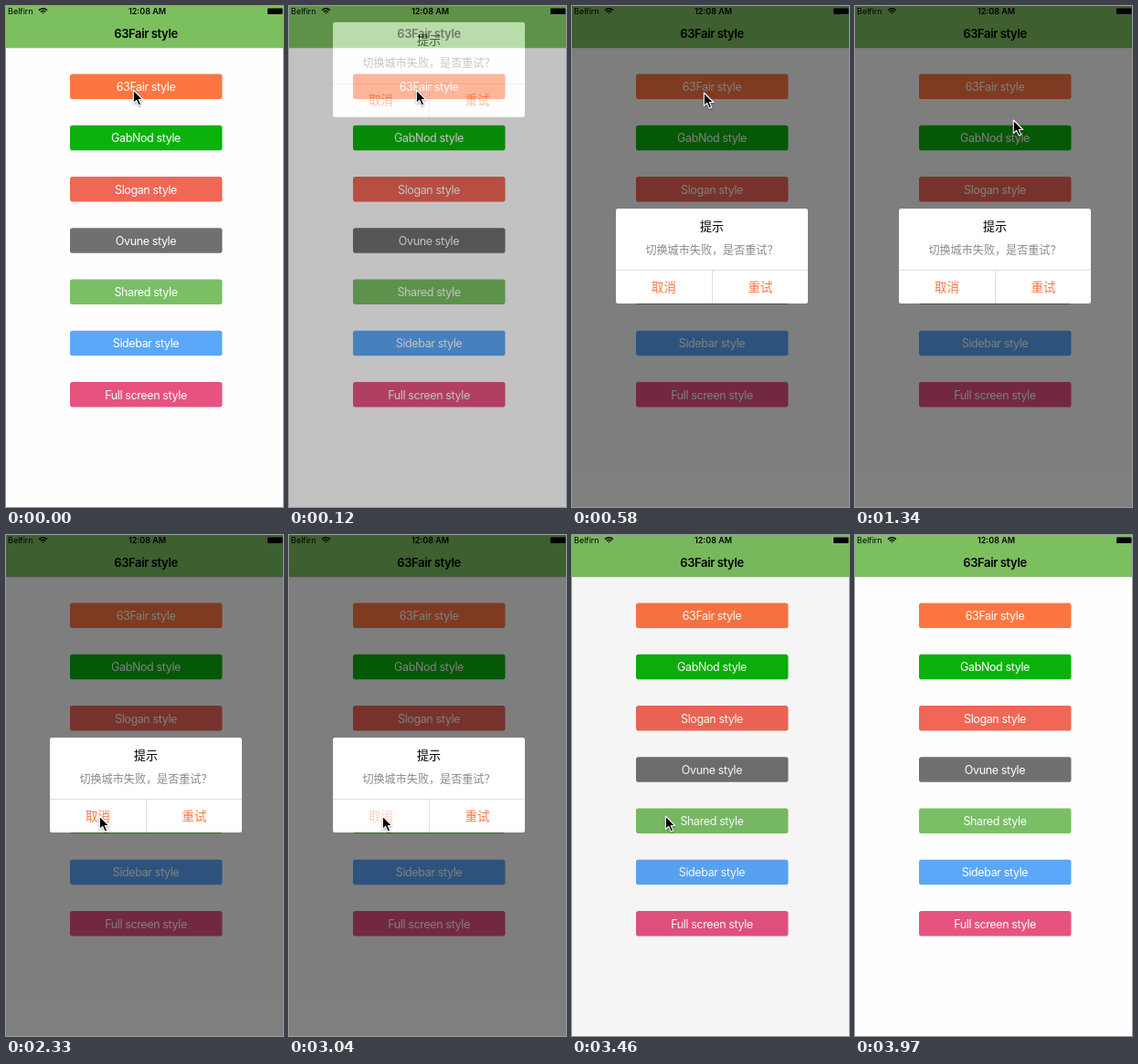
An HTML page that plays this animation: 303x549 px, repeating every 5310 ms.

```html
<!DOCTYPE html>
<html lang="zh-CN">
<head>
<meta charset="utf-8">
<style>
  html, body { margin: 0; width: 100%; height: 100%; overflow: hidden; background: #fefefe; }
  svg { display: block; width: 100vw; height: 100vh; }
  text { font-family: Inter, "Noto Sans CJK SC", "Noto Sans CJK", sans-serif; text-anchor: middle; }
  .status { font-size: 9px; }
  .title { font-size: 13px; font-weight: 600; letter-spacing: -.03em; }
  .label { font-size: 12.5px; letter-spacing: -.03em; fill: #fff; }
  #dialog text { font-family: "Noto Sans CJK SC", "Noto Sans CJK", sans-serif; }
  .action { font-size: 13.5px; fill: #fd7642; }
</style>
</head>
<body>
<svg viewBox="0 0 303 549">
  <rect width="303" height="549" fill="#fefefe"/>
  <rect width="303" height="46" fill="#7cbf5f"/>
  <rect y="45.5" width="303" height=".7" fill="#a9b8a3"/>
  <text class="status" x="2" y="9" style="text-anchor:start">Belfirn</text>
  <g fill="none" stroke="#000" stroke-width="1.4">
    <path d="M36 4.6Q40.5.9 45 4.6M37.8 6.5Q40.5 4.3 43.2 6.5"/>
    <path d="M39.2 7.3H41.8L40.5 8.8Z" fill="#000" stroke="none"/>
  </g>
  <text class="status" x="154.500" y="9" font-weight="600">12:08 AM</text>
  <rect x="286" y="2.500" width="16.500" height="6.500" rx="1"/>
  <text class="title" x="153" y="34.500">63Fair style</text>
  <g id="buttons"></g>

  <g id="alert">
    <rect width="303" height="549" fill-opacity=".5"/>
    <g id="dialog">
      <rect x="48" y="222" width="210" height="104" rx="2.500" fill="#fff"/>
      <path d="M48 289.500H258M153.500 289.500V326" stroke="#dcdcdc" stroke-width=".9"/>
      <text x="153" y="246" font-size="13" font-weight="500">提示</text>
      <text x="153" y="271.600" font-size="12.100" fill="#888">切换城市失败，是否重试？</text>
      <text id="cancel" class="action" x="100.500" y="312.600">取消</text>
      <text class="action" x="206" y="312.600">重试</text>
    </g>
  </g>

  <path id="cursor" d="M1.300 1V15.500L4.700 12.400L7.200 18L9.700 16.900L7.300 11.500H11.800Z"
        stroke="#fff" stroke-width="1.100" stroke-linejoin="round"
        style="filter:drop-shadow(0 1px 1px rgba(0,0,0,.35))"/>
</svg>
<script>
const LOOP = 5310, STEP = 58.35, SLIDE = 384, FADE = 250;
const OPEN_AT = -3, CLOSE_AT = 3233;
const $ = id => document.getElementById(id);

const styles = [
  ['63Fair', '#fd7642'], ['GabNod', '#0bb20b'], ['Slogan', '#f06756'], ['Ovune', '#707070'],
  ['Shared', '#7abf65'], ['Sidebar', '#5ba7fa'], ['Full screen', '#e6537f'],
];
$('buttons').innerHTML = styles.map(([name, color], i) => {
  const y = 74.5 + i * 56.25;
  return `<rect x="70" y="${y}" width="166.5" height="27.5" rx="2.8" fill="${color}"/>
    <text class="label" x="153" y="${y + 18.5}">${name} style</text>`;
}).join('');

// Pointer waypoints: step, x, y
const path = [
  [0, 138, 91], [9, 138, 91], [10, 143, 94], [18, 172, 120], [22, 172, 120], [23, 172, 124],
  [24, 171, 125], [28, 171, 125], [31, 158, 165], [35, 122, 275], [38, 108, 307],
  [40, 101, 307], [63, 101, 307], [67, 279, 378],
];

function pointerAt(step) {
  const i = Math.max(1, path.findIndex(p => p[0] >= step));
  const [s0, x0, y0] = path[i - 1], [s1, x1, y1] = path[i];
  const k = (step - s0) / (s1 - s0);
  return [x0 + (x1 - x0) * k, y0 + (y1 - y0) * k];
}

function ease(t) {
  t = Math.min(1, Math.max(0, t));
  return t * t * (3 - 2 * t);
}

function draw(now) {
  const step = Math.floor((now % LOOP + 10) / STEP);
  const time = step * STEP;
  const shown = step ? ease((time - OPEN_AT) / FADE) : 0;
  const gone = ease((time - CLOSE_AT) / FADE);

  $('alert').setAttribute('opacity', shown - gone);
  $('dialog').setAttribute('transform', `translate(0 ${(shown - 1 + gone) * SLIDE})`);
  $('cancel').setAttribute('opacity', step >= 52 && step < 56 ? .35 : 1);

  const visible = step < 68;
  $('cursor').setAttribute('visibility', visible ? 'visible' : 'hidden');
  if (visible) $('cursor').setAttribute('transform', `translate(${pointerAt(step)})`);
}

const start = performance.now();
function tick() {
  draw(performance.now() - start);
  requestAnimationFrame(tick);
}
tick();
</script>
</body>
</html>
```
